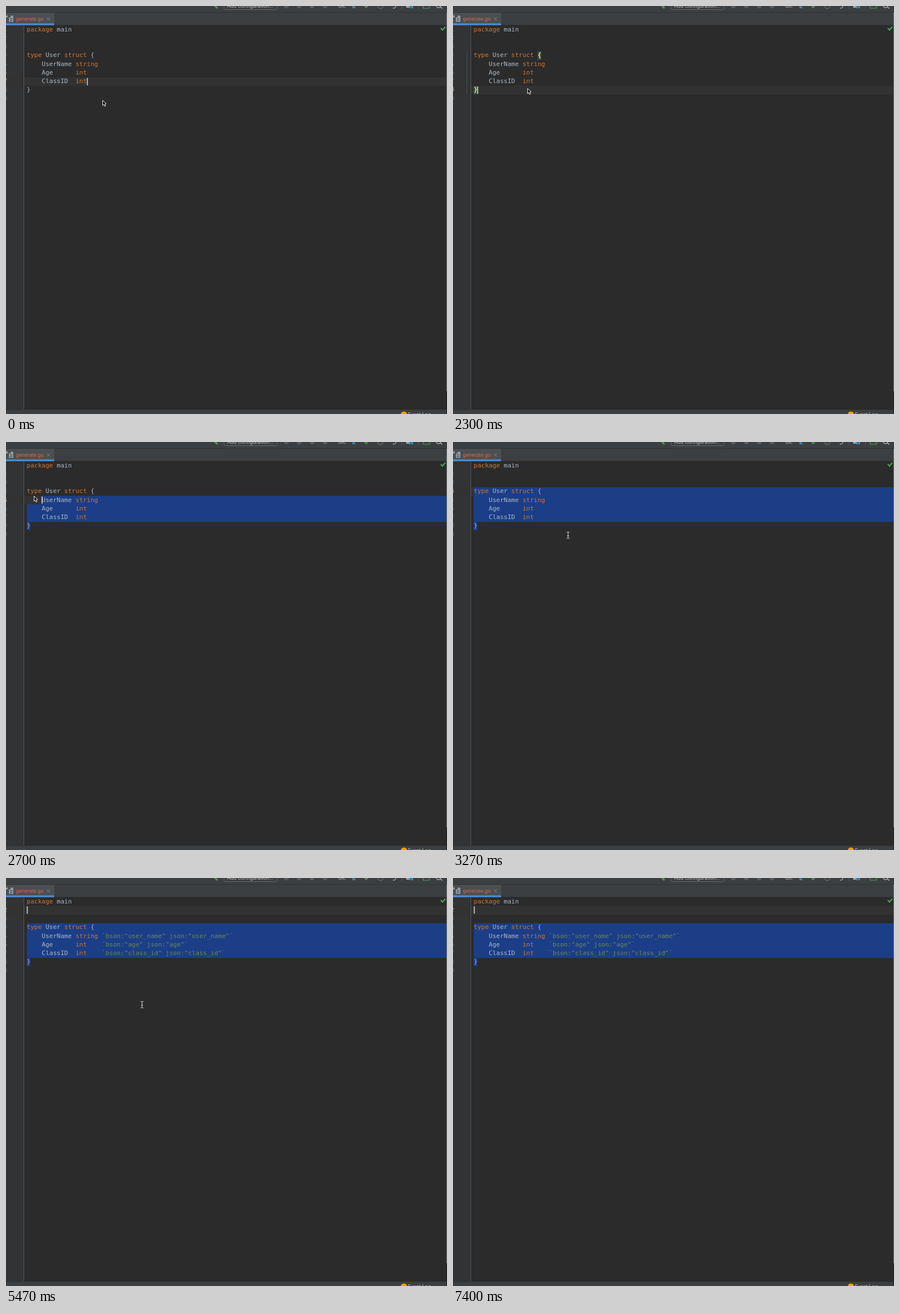
Recreate the animation shown at these times as an HTML page with a canvas. Size 778 px wide and 720 px high, loop 7.43 s.

```html
<!DOCTYPE html>
<html lang="en">
<head>
<meta charset="utf-8">
<title>Struct tags</title>
<style>
html, body { margin: 0; height: 100%; overflow: hidden; background: #2b2b2b; }
canvas { display: block; }
</style>
</head>
<body>
<canvas id="stage" width="778" height="720"></canvas>
<script>
const g = document.getElementById('stage').getContext('2d');
const LOOP = 7430, LEFT = 36.6, CHAR = 6.622, TOP = 34, ROW = 15.25;
const MONO = '11px "DejaVu Sans Mono", monospace';
const UI = '9.25px Roboto, sans-serif';
const CLICK_BELOW = 1050, CLICK_BRACE = 2270, DRAG = 2530, DROP = 2790;
const TEXT_POINTER = 2950, TAGS = 5150, POINTER_GONE = 6000;

const code = [
  'package main', '', '', 'type User struct {',
  '    UserName string', '    Age      int', '    ClassID  int', '}', ''
];
const tag = name => `\`bson:"${name}" json:"${name}"\``;
const fields = { 4: 'user_name', 5: 'age', 6: 'class_id' };
const tagged = code.map((s, r) => fields[r] ? s.padEnd(20) + tag(fields[r]) : s);

// pointer moves: from ms, to ms, x, y
const home = { x: 170, y: 166 };
const moves = [
  [30, 370, 168, 169], [630, 1330, 134, 168], [1430, 1630, 131, 157],
  [1970, 2100, 131, 145], [DRAG, DROP, 38, 88], [TEXT_POINTER, 3500, 238, 180],
  [4070, 4800, 238, 186], [4830, 5500, 240, 223], [5570, 5900, 240, 232]
];

const colX = c => LEFT + c * CHAR;
const rowY = r => Math.round(TOP + r * ROW);
const baseY = r => Math.round(TOP + r * ROW + 10.7);

function pointerAt(t) {
  let { x, y } = home;
  for (const [from, to, toX, toY] of moves) {
    const left = 1 - Math.min(1, Math.max(0, (t - from) / (to - from)));
    const k = 1 - left * left;
    x += (toX - x) * k;
    y += (toY - y) * k;
  }
  return { x, y };
}

// text position under the pointer; an indent is one step
function hit(t) {
  const { x, y } = pointerAt(t);
  const row = Math.floor((y - TOP) / ROW);
  let col = Math.min(code[row].length, Math.round((x - LEFT) / CHAR));
  if (code[row].startsWith('    ') && col < 4) col = col < 2 ? 0 : 4;
  return { row, col };
}

function caretAt(t) {
  if (t < CLICK_BELOW) return { row: 6, col: code[6].length };
  if (t < CLICK_BRACE) return hit(CLICK_BELOW);
  if (t < DRAG) return hit(CLICK_BRACE);
  if (t < TAGS) return hit(Math.min(t - 30, DROP));
  return { row: 1, col: 0 };
}

function caretOn(t) {
  if (t < DROP) return true;
  return t < TAGS ? t % 1000 >= 500 : (t - TAGS) % 1000 < 500;
}

function box(x, y, w, h, color) {
  g.fillStyle = color;
  g.fillRect(x, y, w, h);
}
function text(s, x, y, color, font = UI, align = 'left') {
  g.font = font;
  g.textAlign = align;
  g.fillStyle = color;
  g.fillText(s, x, y);
}
function line(color, width, ...p) {
  g.strokeStyle = color;
  g.lineWidth = width;
  g.beginPath();
  for (let i = 0; i < p.length; i += 2) g.lineTo(p[i], p[i + 1]);
  g.stroke();
}
function arc(x, y, r, color, filled, from = 0, to = 7) {
  g.fillStyle = g.strokeStyle = color;
  g.lineWidth = 1.3;
  g.beginPath();
  g.arc(x, y, r, from, to);
  filled ? g.fill() : g.stroke();
}

function toolbar() {
  const dim = '#585b5d', grey = '#afb1b3', green = '#499c54', blue = '#3592c4';
  box(0, 0, 778, 34, '#3c3f41');
  box(0, 11, 778, 1, '#323232');
  line(green, 3, 366, -3, 373, 4);
  g.strokeStyle = '#646668';
  g.lineWidth = 1;
  g.beginPath();
  g.roundRect(384.5, -12.5, 94, 19, 3);
  g.stroke();
  text('Add Configuration...', 390, 3, '#bbbbbb');
  text('Git:', 586, 3, '#bbbbbb');
  for (let i = 0; i < 4; i++) arc(494.5 + i * 22.8, 0, 4.3, dim, true);
  line(blue, 1.6, 612, -3, 612, 3, 617, 3);
  line(blue, 1.6, 612, 3, 618, -3);
  line(green, 1.8, 632, -1, 635.5, 3, 641, -4);
  arc(660.5, 0, 4.5, '#66696b');
  arc(684, 0, 3.8, grey, false, -1.5, 2);
  for (const x of [698, 727]) box(x, 0, 1, 6, '#515456');
  box(706, -3, 6, 6, '#9aa7b0');
  for (const x of [711, 715]) box(x, 0, 3, 4, blue);
  line(green, 1.2, 736, -4, 736, 4, 747, 4, 747, -4);
  arc(763, -1, 4, grey);
  line(grey, 1.6, 766, 1, 769.5, 4.5);
}

function tab() {
  box(0, 12, 85, 19, '#4b4f51');
  box(0, 30.5, 85, 3.5, '#4a88c7');
  box(85, 33, 693, 1, '#323232');
  text('*', -1, 24, '#bbbbbb', '11px Roboto, sans-serif');
  box(5, 17, 8, 11, '#8d979e');
  box(5, 17, 3, 3, '#4b4f51');
  for (const y of [22, 25]) box(7, y, 4, 1, '#3c4043');
  text('generate.go', 17.5, 26, '#d5684f');
  line('#7d8082', 1, 72, 20, 77.5, 25.5);
  line('#7d8082', 1, 77.5, 20, 72, 25.5);
}

function statusBar() {
  box(0, 712, 778, 8, '#3c3f41');
  box(0, 712, 778, 1, '#323232');
  arc(702, 721, 5.5, '#eda200', true);
  text('1', 702, 725, '#3c3f41', 'bold 8px Roboto, sans-serif', 'center');
  text('Event Log', 709, 724, '#bbbbbb');
}

function selection({ row, col }) {
  const color = '#1c3e87';
  for (let r = row; r < 7; r++) {
    const x = r === row ? colX(col) : LEFT;
    box(x, rowY(r), 777 - x, rowY(r + 1) - rowY(r), color);
  }
  box(LEFT, rowY(7), CHAR, rowY(8) - rowY(7), color);
}

function codeLine(s, row) {
  for (const m of s.matchAll(/`.*`|\S+/g)) {
    const color = m[0][0] === '`' ? '#6a8759'
      : /^(package|type|struct|string|int)$/.test(m[0]) ? '#cc7832' : '#a9b7c6';
    text(m[0], colX(m.index), baseY(row), color, MONO);
  }
}

function brace(s, row, col) {
  box(colX(col), rowY(row), CHAR, 15, '#3b514d');
  text(s, colX(col), baseY(row), '#ffef28', 'bold ' + MONO);
}

function arrow() {
  g.beginPath();
  for (const [x, y] of [[.5, .5], [.5, 9.5], [2.6, 7.7], [4, 11], [5.7, 10.3], [4.3, 7], [7, 6.7]])
    g.lineTo(x, y);
  g.closePath();
  g.fillStyle = '#111';
  g.fill();
  g.strokeStyle = '#e8e8e8';
  g.lineWidth = 1;
  g.stroke();
}

function beam() {
  const color = '#dddddd';
  box(-.5, -5, 1, 11, color);
  box(-1.5, 1, 3, 1, color);
  for (const y of [-5.5, 5.5])
    for (const x of [-2.5, .5]) box(x, y, 2, 1, color);
}

function pointer(t) {
  if (t > POINTER_GONE) return;
  const { x, y } = pointerAt(t);
  g.save();
  g.translate(Math.round(x), Math.round(y));
  t < TEXT_POINTER ? arrow() : beam();
  g.restore();
}

function draw(t) {
  const caret = caretAt(t), { row, col } = caret;
  box(0, 0, 778, 720, '#2b2b2b');
  box(0, 34, 31, 678, '#313335');
  box(0, rowY(row), 777, rowY(row + 1) - rowY(row), '#323232');
  box(31, 34, 1, 678, '#555555');
  if (t >= TAGS) selection({ row: 3, col: 0 });
  else if (t > DRAG && row < 7) selection(caret);

  (t < TAGS ? code : tagged).forEach((s, r) => {
    text(r + 1, 2.2, baseY(r), r === row ? '#a4a3a3' : '#606366', MONO, 'right');
    codeLine(s, r);
  });
  if (row === 7) {
    box(24, rowY(3), 1, rowY(8) - rowY(3), '#3b514d');
    brace('{', 3, 17);
    brace('}', 7, 0);
  }
  if (caretOn(t)) box(Math.round(colX(col)) - .3, rowY(row) + 1, 1.6, 13, '#d0d0d0');

  toolbar();
  tab();
  statusBar();
  line('#499c54', 2.2, 767, 39, 770, 42.5, 775, 36.5);
  box(777, 12, 1, 668, '#74767a');
  box(777, 680, 1, 40, '#1c1c1c');
  pointer(t);
}

const start = performance.now();
function frame() {
  draw((performance.now() - start) % LOOP);
  requestAnimationFrame(frame);
}
frame();
</script>
</body>
</html>
```
